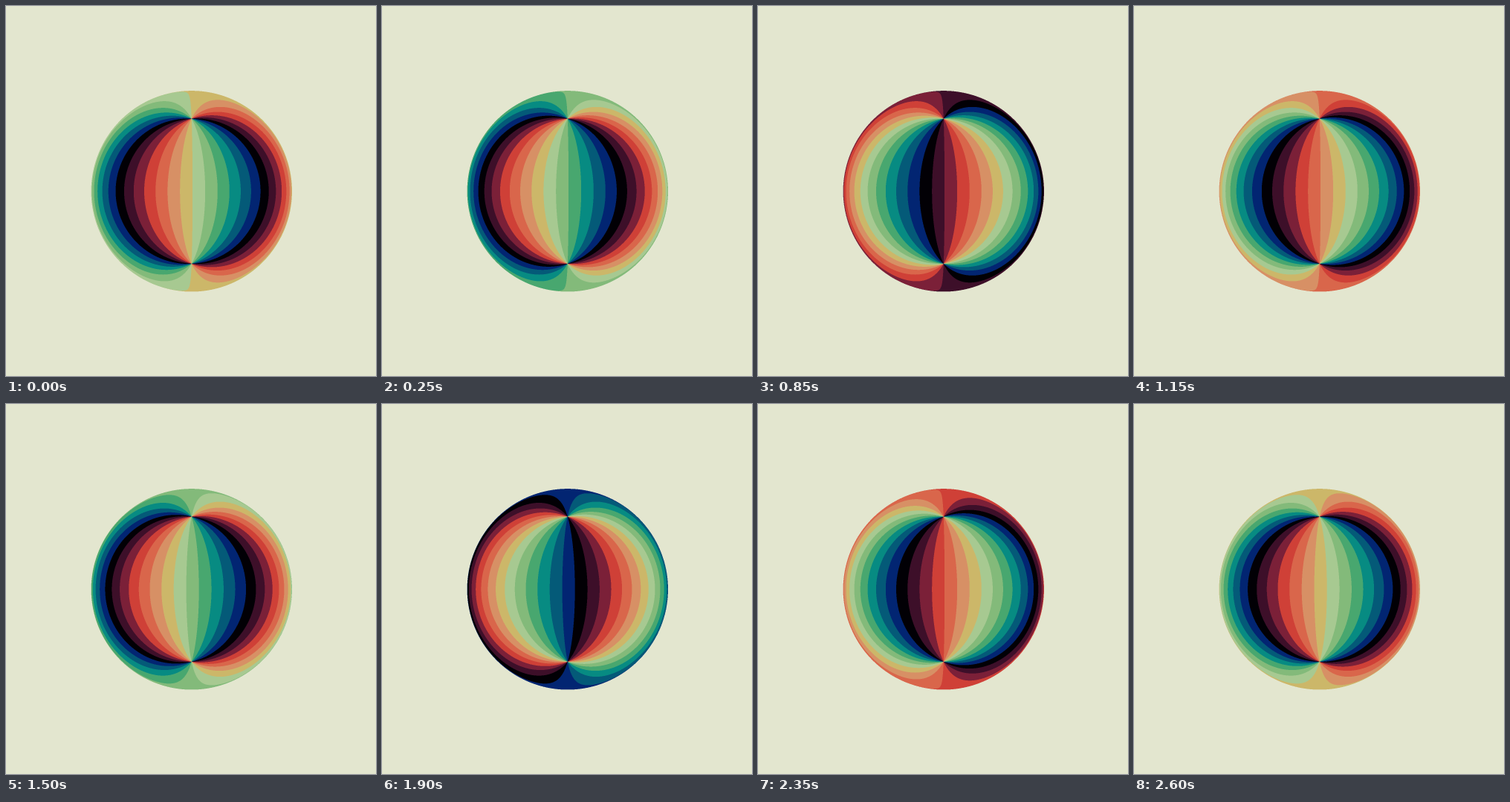
Recreate the animation shown at these times as an HTML page with a canvas. Size 498 by 498 pixels, loop 2650 ms.

```html
<!DOCTYPE html>
<html lang="en">
<head>
<meta charset="utf-8">
<title>Striped sphere</title>
<style>
  html, body { margin: 0; width: 100%; height: 100%; overflow: hidden; background: #e3e6cf; }
  canvas { display: block; }
</style>
</head>
<body>
<canvas id="stage" width="498" height="498"></canvas>
<script>
const ctx = document.getElementById('stage').getContext('2d');
const toRgb = hex => [1, 3, 5].map(i => parseInt(hex.slice(i, i + 2), 16));
const background = toRgb('#e3e6cf');
const palette = [
  '#a7c991', '#83ba7a', '#48a76f', '#078b82', '#045a78', '#022572', '#020005',
  '#3d0f29', '#7b2038', '#cf4037', '#d9664b', '#d79065', '#ccb769'
].map(toRgb);

const CX = 249.8, CY = 249.3, RADIUS = 135.2;
const POLE = 1.044;              // pole distance on the unprojected plane
const BANDS = 2 * palette.length;
const LEFT = 112, SIZE = 276, SUB = 3;
const FRAME_MS = 50, FRAMES = 53;

// Bipolar angle around the two poles, wrapped onto a sphere, measured in bands.
function bandAt(px, py) {
  const x = (px - CX) / RADIUS, y = (py - CY) / RADIUS;
  const r2 = x * x + y * y;
  if (r2 >= 1) return -1;
  const depth = 1 - r2;
  const angle = Math.atan2(2 * x * POLE * Math.sqrt(depth), POLE * POLE * depth - r2);
  return (angle / (2 * Math.PI) + 0.5) * BANDS;
}

const samples = new Float32Array(SIZE * SIZE * SUB * SUB);
let next = 0;
for (let y = 0; y < SIZE; y++)
  for (let x = 0; x < SIZE; x++)
    for (let k = 0; k < SUB * SUB; k++)
      samples[next++] = bandAt(
        LEFT + x + (k % SUB + 0.5) / SUB,
        LEFT + y + (Math.floor(k / SUB) + 0.5) / SUB);

const image = ctx.createImageData(SIZE, SIZE);

function draw(shift) {
  const count = SUB * SUB;
  for (let pixel = 0, s = 0; pixel < SIZE * SIZE; pixel++) {
    let r = 0, g = 0, b = 0;
    for (let k = 0; k < count; k++) {
      const band = samples[s++];
      const color = band < 0 ? background : palette[Math.floor(band + shift) % palette.length];
      r += color[0];
      g += color[1];
      b += color[2];
    }
    const o = pixel * 4;
    image.data[o] = r / count;
    image.data[o + 1] = g / count;
    image.data[o + 2] = b / count;
    image.data[o + 3] = 255;
  }
  ctx.putImageData(image, LEFT, LEFT);
}

ctx.fillStyle = '#e3e6cf';
ctx.fillRect(0, 0, 498, 498);

// Half a band per step, with one step of rest at the start of the loop.
const start = performance.now();
let shown = -1;
function tick() {
  const step = Math.floor((performance.now() - start) / FRAME_MS) % FRAMES;
  if (step !== shown) {
    shown = step;
    draw(palette.length + Math.max(0, step - 1) / 2 - 0.08);
  }
  requestAnimationFrame(tick);
}
tick();
</script>
</body>
</html>
```
